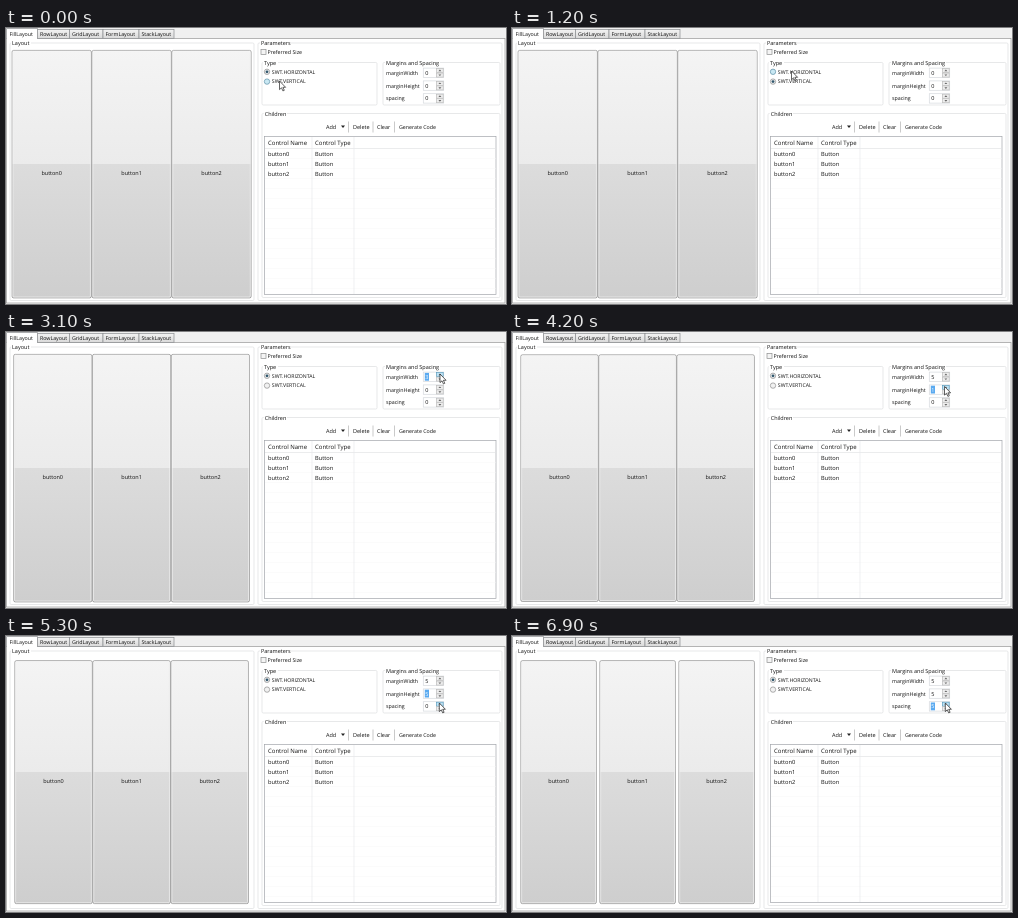
Write an HTML page that moves like this. It is 500 by 276 pixels and loops after 7 s.

```html
<!DOCTYPE html>
<html lang="en">
<head>
<meta charset="utf-8">
<title>Fill layout demo</title>
<style>
  html, body { margin: 0; width: 100%; height: 100%; overflow: hidden; background: #fff; }
  svg { display: block; width: 500px; height: 276px; }
  text { font: 5.5px "Open Sans", "Noto Sans", sans-serif; fill: #111; text-rendering: geometricPrecision; }
  .tab { font-size: 5.3px; }
  .radio { font-size: 5.2px; }
  .cell { font-size: 5.7px; }
  .head { font-size: 6px; }
</style>
</head>
<body>
<svg id="stage" viewBox="0 0 500 276">
  <defs>
    <linearGradient id="face" x2="0" y2="1">
      <stop offset="0" stop-color="#f4f4f4"/>
      <stop offset=".46" stop-color="#ebebeb"/>
      <stop offset=".46" stop-color="#dcdcdc"/>
      <stop offset="1" stop-color="#cecece"/>
    </linearGradient>
    <linearGradient id="tab" x2="0" y2="1">
      <stop offset="0" stop-color="#f3f3f3"/>
      <stop offset="1" stop-color="#d9d9d9"/>
    </linearGradient>
  </defs>
</svg>
<script>
const LOOP = 7000, STEP = 100;
const UNIT = 0.55; // stage pixels per layout pixel
const stage = document.getElementById('stage');

function add(name, attrs, content) {
  const el = document.createElementNS('http://www.w3.org/2000/svg', name);
  set(el, attrs);
  if (content !== undefined) el.textContent = content;
  return stage.appendChild(el);
}
function set(el, attrs) {
  for (const key in attrs) el.setAttribute(key, attrs[key]);
}
const box = (x, y, width, height, fill, stroke = 'none', more = {}) =>
  add('rect', { x, y, width, height, fill, stroke, 'stroke-width': 0.7, ...more });
const path = (d, stroke, fill = 'none', width = 0.7) =>
  add('path', { d, stroke, fill, 'stroke-width': width });
const label = (x, y, content, more = {}) => add('text', { x, y, ...more }, content);

function group(x, y, right, bottom, title, titleX, titleEnd) {
  box(x, y, right - x, bottom - y, 'none', '#dddfe0', { rx: 1.2 });
  box(titleX - 1, y - 2, titleEnd - titleX + 2, 4, '#fff');
  label(titleX, y + 2, title);
}

// Tab folder
box(0, 0, 500, 276, '#f0f0f0');
box(0.5, 10.5, 498.5, 264.5, '#fff', '#999');
[['RowLayout', 31.5, 63.5], ['GridLayout', 63.5, 97], ['FormLayout', 97, 133], ['StackLayout', 133, 168]]
  .forEach(([name, x, right]) => {
    box(x, 1.5, right - x, 9, 'url(#tab)', '#8b8d90');
    label(x + 2.4, 8, name, { class: 'tab' });
  });
path('M.5 11V.5H31.5V11', '#8b8d90', '#fff');
label(3.5, 7.5, 'FillLayout', { class: 'tab' });

// Groups
group(4, 15, 248, 272.5, 'Layout', 6, 24);
group(252, 15, 496, 272.5, 'Parameters', 255, 284);
group(256, 34.5, 371, 77, 'Type', 258, 271);
group(377, 34.5, 494, 77, 'Margins and Spacing', 380, 433);
group(256, 85.5, 494, 269.5, 'Children', 258.7, 280);
box(255, 21.5, 5, 5, '#f4f4f4', '#8e8f8f');
label(261.6, 26.2, 'Preferred Size', { class: 'tab' });

// Toolbar and table
label(320, 101, 'Add');
path('M335 97.5h4l-2 2.5z', 'none', '#222');
label(347, 101, 'Delete');
label(371, 101, 'Clear');
label(393, 101, 'Generate Code', { class: 'tab' });
path('M342.5 93.5v11M367 93.5v11M388.5 93.5v11', '#b4b4b4');
box(258.5, 108.5, 231.5, 158, '#fff', '#a3a6ab');
for (let y = 130.5; y < 265; y += 10) path(`M259 ${y}H489.5`, '#f9f9f9');
path('M259 120.5H489.5', '#e3e4e6');
path('M306 109V266M348 109V266', '#e9eaec');
label(262, 117, 'Control Name', { class: 'head' });
label(309, 117, 'Control Type', { class: 'head' });
for (let i = 0; i < 3; i++) {
  label(262, 127.5 + i * 10, 'button' + i, { class: 'cell' });
  label(309, 127.5 + i * 10, 'Button', { class: 'cell' });
}

// Moving parts
const buttons = [0, 1, 2].map(i => ({
  face: box(0, 0, 1, 1, 'url(#face)', '#858585', { rx: 1.5 }),
  shine: box(0, 0, 1, 1, 'none', '#f6f6f6', { rx: 1 }),
  text: label(0, 0, 'button' + i, { 'text-anchor': 'middle' })
}));
const radios = [['SWT.HORIZONTAL', 43.8], ['SWT.VERTICAL', 53.6]].map(([name, y]) => {
  const ring = add('circle', { cx: 261, cy: y, r: 2.7, 'stroke-width': 0.7 });
  const dot = add('circle', { cx: 261, cy: y, r: 1.4, fill: '#2f566c' });
  label(265.8, y + 1.8, name, { class: 'radio' });
  return { ring, dot, y };
});
const spinners = [['marginWidth', 44.8], ['marginHeight', 57.6], ['spacing', 70.4]].map(([name, y]) => {
  label(380, y + 2, name, { class: 'tab' });
  box(417.3, y - 4.7, 20.4, 9.4, '#fff', '#d6d9dd');
  const up = box(430.5, y - 4.2, 6.7, 4, '#eee', '#b5b5b5');
  box(430.5, y + 0.3, 6.7, 4, '#eee', '#bdbdbd');
  path(`M432.4 ${y - 1.5}h3l-1.5 -1.7zM432.4 ${y + 1.6}h3l-1.5 1.7z`, 'none', '#666');
  const mark = box(418.8, y - 3.9, 4.2, 7.8, '#5aaaf0');
  const value = label(419.3, y + 2, '0');
  return { up, mark, value, y };
});
const cursor = path('M0 0V8.6L2 6.8L3.4 9.9L4.8 9.3L3.4 6.3H6.1Z', '#222', '#fff', 0.7);

const VERTICAL_FROM = 300, VERTICAL_TO = 1200, RADIO_TO = 1300;
// Times at which each spinner goes up by one
const clicks = [
  [2300, 2600, 2900, 3200, 3400],
  [4100, 4300, 4500, 4700, 4900],
  [5500, 5800, 6000, 6300, 6500]
];
// time, x, y of the pointer tip
const route = [
  [0, 273.5, 53], [600, 273.5, 53], [1100, 279.5, 43], [1400, 279.5, 43], [2100, 434, 42],
  [3500, 434, 42], [4000, 432.5, 54.5], [4900, 432.5, 54.5], [5300, 433.3, 67], [LOOP, 433.3, 67]
];

function pointer(t) {
  const i = route.findIndex(p => p[0] > t);
  const [t0, x0, y0] = route[i - 1], [t1, x1, y1] = route[i];
  const k = (t - t0) / (t1 - t0), e = k * k * (3 - 2 * k);
  return [x0 + (x1 - x0) * e, y0 + (y1 - y0) * e];
}

function layOut(vertical, [marginW, marginH, spacing]) {
  const left = 6.1 + marginW * UNIT, top = 22.4 + marginH * UNIT / 1.2;
  const width = 251.2 - 2 * left, height = 292.3 - 2 * top;
  const gap = 0.8 + spacing * UNIT;
  const w = vertical ? width : (width - 2 * gap) / 3;
  const h = vertical ? (height - 2 * gap) / 3 : height;
  buttons.forEach(({ face, shine, text }, i) => {
    const x = left + (vertical ? 0 : i * (w + gap));
    const y = top + (vertical ? i * (h + gap) : 0);
    set(face, { x, y, width: w, height: h });
    set(shine, { x: x + 0.8, y: y + 0.8, width: w - 1.6, height: h - 1.6 });
    set(text, { x: x + w / 2, y: y + h / 2 + 1.3 });
  });
}

function draw(now) {
  const t = Math.floor((now % LOOP) / STEP) * STEP;
  const [x, y] = pointer(t);
  const values = clicks.map(times => times.filter(c => c <= t).length);
  const focus = values.reduce((last, v, i) => v ? i : last, -1);

  layOut(t >= VERTICAL_FROM && t < VERTICAL_TO, values);

  const chosen = t >= VERTICAL_FROM && t < RADIO_TO ? 1 : 0;
  radios.forEach(({ ring, dot, y: cy }, i) => {
    const hot = x < 320 && Math.abs(y - cy) < 4.5;
    set(ring, { fill: hot ? '#c9e8f3' : '#f1f1f1', stroke: hot ? '#5f91a8' : '#8e8f8f' });
    set(dot, { opacity: i === chosen ? 1 : 0 });
  });
  spinners.forEach(({ up, mark, value, y: cy }, i) => {
    const hot = x > 430 && Math.abs(y + 1.5 - cy) < 4;
    set(up, { fill: hot ? '#bfe4f7' : '#eee', stroke: hot ? '#5b9cbd' : '#bdbdbd' });
    set(mark, { opacity: i === focus ? 1 : 0 });
    value.style.fill = i === focus ? '#fff' : '#111';
    value.textContent = values[i];
  });
  set(cursor, { transform: `translate(${x} ${y})` });
}

const start = performance.now();
function tick() {
  draw(performance.now() - start);
  requestAnimationFrame(tick);
}
tick();
</script>
</body>
</html>
```
